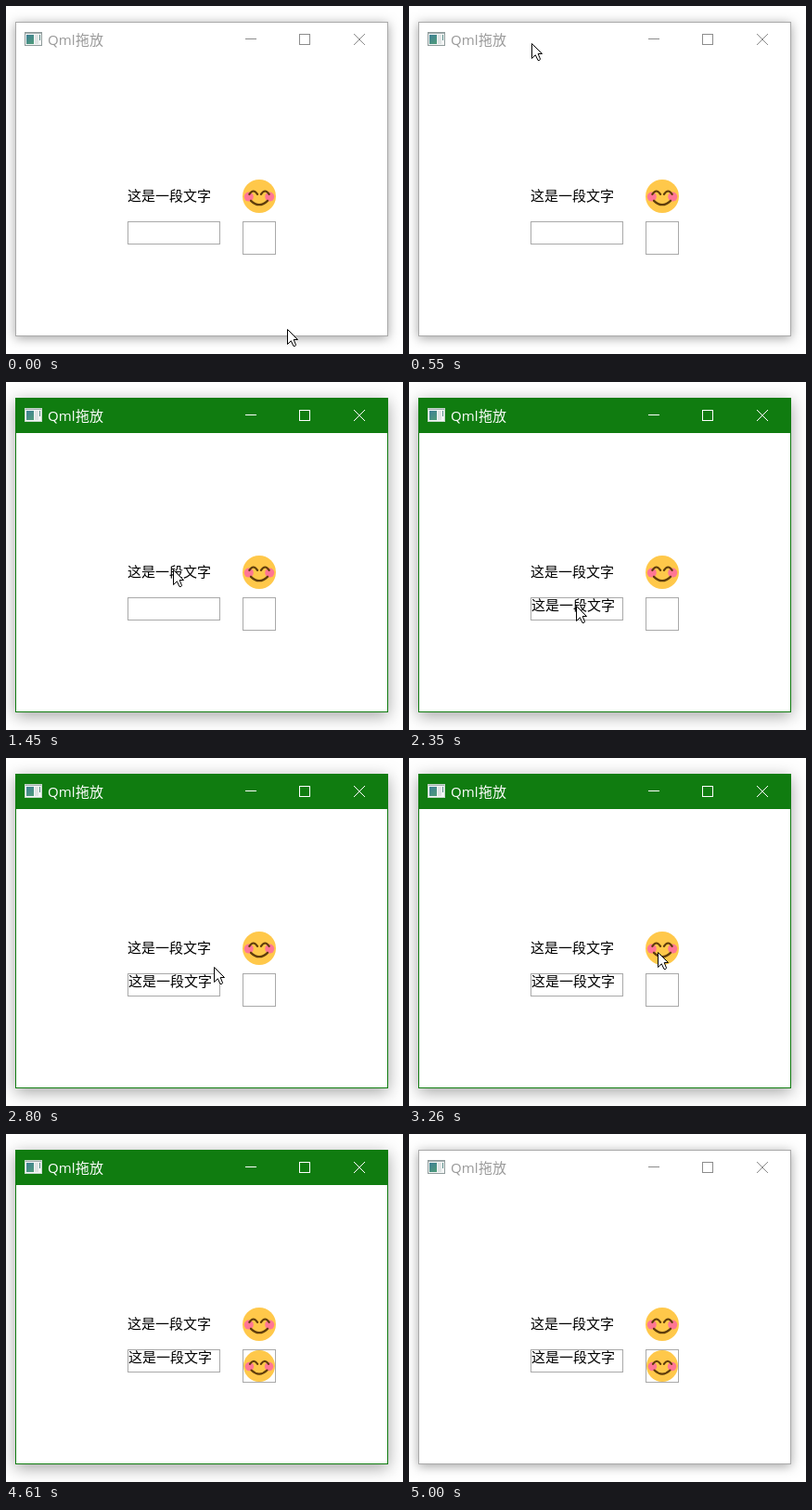
Recreate the animation shown at these times as an HTML page with a canvas. Size 428 px wide and 375 px high, loop 5080 ms.

```html
<!DOCTYPE html>
<html lang="zh">
<head>
<meta charset="utf-8">
<style>
  html, body { margin: 0; width: 100%; height: 100%; overflow: hidden; background: #fff; }
  canvas { display: block; }
</style>
</head>
<body>
<canvas id="stage" width="428" height="375"></canvas>
<script>
const ctx = document.getElementById('stage').getContext('2d');
const LOOP = 5080;
const PACE = 73; // pointer positions refresh at this interval, in ms
const CJK = '"Noto Sans CJK SC", "Noto Sans CJK", sans-serif';
const LABEL = '这是一段文字';

const home = { x: 303, y: 348 };
const onText = { x: 180, y: 202 };
const inField = { x: 180, y: 241 };
const onSmiley = { x: 268, y: 209 };
const inSquare = { x: 274, y: 248 };

// Each move continues from the previous one; dx and dy bow its path.
const moves = [
  { begin: 60, end: 550, to: { x: 132, y: 40 } },
  { begin: 770, end: 1230, to: onText, dy: 65 },
  { begin: 1520, end: 1890, to: inField, dx: -8 },
  { begin: 2580, end: 2960, to: onSmiley },
  { begin: 3330, end: 3560, to: inSquare, dx: -9 },
  { begin: 4390, end: 4610, to: { x: 400, y: 376 } }
];

const within = (t, a, b) => t >= a && t < b;
const mix = (a, b, p) => a + (b - a) * p;
const smooth = p => p * p * (3 - 2 * p);

function pointerAt(t) {
  let pos = home;
  for (const { begin, end, to, dx = 0, dy = 0 } of moves) {
    if (t < begin) break;
    const count = Math.round((end - begin) / PACE) + 1;
    const gap = (end - begin) / (count - 1);
    const step = Math.min(count, Math.floor((t - begin) / gap + 0.05) + 1);
    const p = smooth(step / count);
    const bow = 4 * p * (1 - p);
    pos = {
      x: Math.round(mix(pos.x, to.x, p) + bow * dx),
      y: Math.round(mix(pos.y, to.y, p) + bow * dy)
    };
  }
  return pos;
}

function fill(color, x, y, w, h) {
  ctx.fillStyle = color;
  ctx.fillRect(x, y, w, h);
}

function frame(color, x, y, w, h) {
  ctx.strokeStyle = color;
  ctx.lineWidth = 1;
  ctx.strokeRect(x + 0.5, y + 0.5, w - 1, h - 1);
}

function disc(color, x, y, r) {
  ctx.fillStyle = color;
  ctx.beginPath();
  ctx.arc(x, y, r, 0, Math.PI * 2);
  ctx.fill();
}

function curve(color, width, path) {
  ctx.strokeStyle = color;
  ctx.lineWidth = width;
  ctx.stroke(new Path2D(path));
}

function text(str, x, y, color, font) {
  ctx.fillStyle = color;
  ctx.font = font;
  ctx.fillText(str, x, y);
}

function drawIcon(x, y, active) {
  fill('#f4f6f6', x, y, 19, 15);
  frame(active ? '#c3d6c8' : '#8f9b9b', x, y, 19, 15);
  fill('#a3afb0', x + 1, y + 1, 17, 1);
  const teal = ctx.createLinearGradient(x + 2, y + 3, x + 10, y + 13);
  teal.addColorStop(0, '#3f7f96');
  teal.addColorStop(1, '#4f9c78');
  fill(teal, x + 2, y + 3, 8, 10);
  fill('#dfe4e4', x + 11, y + 3, 4, 10);
  fill('#5b8f8a', x + 16, y + 3, 1, 6);
}

function drawWindow(active) {
  ctx.save();
  ctx.shadowColor = 'rgba(0,0,0,0.36)';
  ctx.shadowBlur = active ? 16 : 11;
  ctx.shadowOffsetY = active ? 4 : 2;
  fill('#fff', 10, 17, 402, 339);
  ctx.restore();
  const green = '#107c10';
  if (active) fill(green, 10, 17, 402, 38);
  frame(active ? green : '#aaa', 10, 17, 402, 339);

  drawIcon(20, 28, active);
  const ink = active ? '#fff' : '#999';
  text('Qml', 45, 42, ink, '15px "Open Sans", "Noto Sans", sans-serif');
  text('拖放', 75, 42, ink, '15px ' + CJK);

  const mark = active ? '#fff' : '#8c8c8c';
  fill(mark, 258, 35, 12, 1);
  frame(mark, 316, 30, 12, 12);
  curve(mark, 1, 'M375 30L387 42M387 30L375 42');
}

function drawSmiley(cx, cy, r) {
  const brown = '#5f3d0c';
  ctx.save();
  ctx.translate(cx, cy);
  ctx.scale(r / 18, r / 18);
  ctx.lineCap = 'round';
  disc('#ffc84a', 0, 0, 18);
  for (const side of [-1, 1]) {
    disc('#ff7694', side * 11.2, 0.6, 5);
    curve(brown, 2.2, `M${side * 6.3 - 4.4} -2.2q4.4 -6.6 8.8 0`);
  }
  curve(brown, 2.3, 'M-9 4.8Q0 13.4 9 4.8');
  ctx.restore();
}

function drawCopyBadge() {
  fill('#fff', 10, 17, 12, 12);
  frame('#000', 10, 17, 12, 12);
  curve('#000', 1, 'M13 22.5h6M16 19.5v6');
}

function drawNoBadge() {
  disc('#fff', 16, 23, 6);
  curve('#000', 1.5, 'M11.3 23a4.7 4.7 0 1 1 9.4 0a4.7 4.7 0 1 1 -9.4 0M12.7 19.7l6.6 6.6');
}

function drawPointer({ x, y }, badge) {
  ctx.save();
  ctx.translate(x, y);
  const outline = 'M.5 .5V16.5L4.3 12.8L7 18.5H8.7L9.5 17.2L7.2 11.5H11.5Z';
  ctx.fillStyle = '#fff';
  ctx.fill(new Path2D(outline));
  curve('#000', 1, outline);
  if (badge) badge();
  ctx.restore();
}

function draw(t) {
  fill('#fff', 0, 0, 428, 375);
  drawWindow(within(t, 630, 5000));

  const font = '300 15px ' + CJK;
  text(LABEL, 131, 210, '#000', font);
  drawSmiley(273, 205, 18);
  if (t >= 2350) text(LABEL, 132, 246, '#000', font);
  if (t >= 4080) drawSmiley(273, 250, 17);
  frame('#a9a9a9', 131, 232, 100, 25);
  frame('#a9a9a9', 255, 232, 36, 36);

  const tip = pointerAt(t);
  const dragging = within(t, 1520, 2350) || within(t, 3330, 4080);
  const badge = tip.y >= 232 ? drawCopyBadge : drawNoBadge;
  drawPointer(tip, dragging && badge);
}

const start = performance.now();
function tick() {
  draw((performance.now() - start) % LOOP);
  requestAnimationFrame(tick);
}
tick();
</script>
</body>
</html>
```
